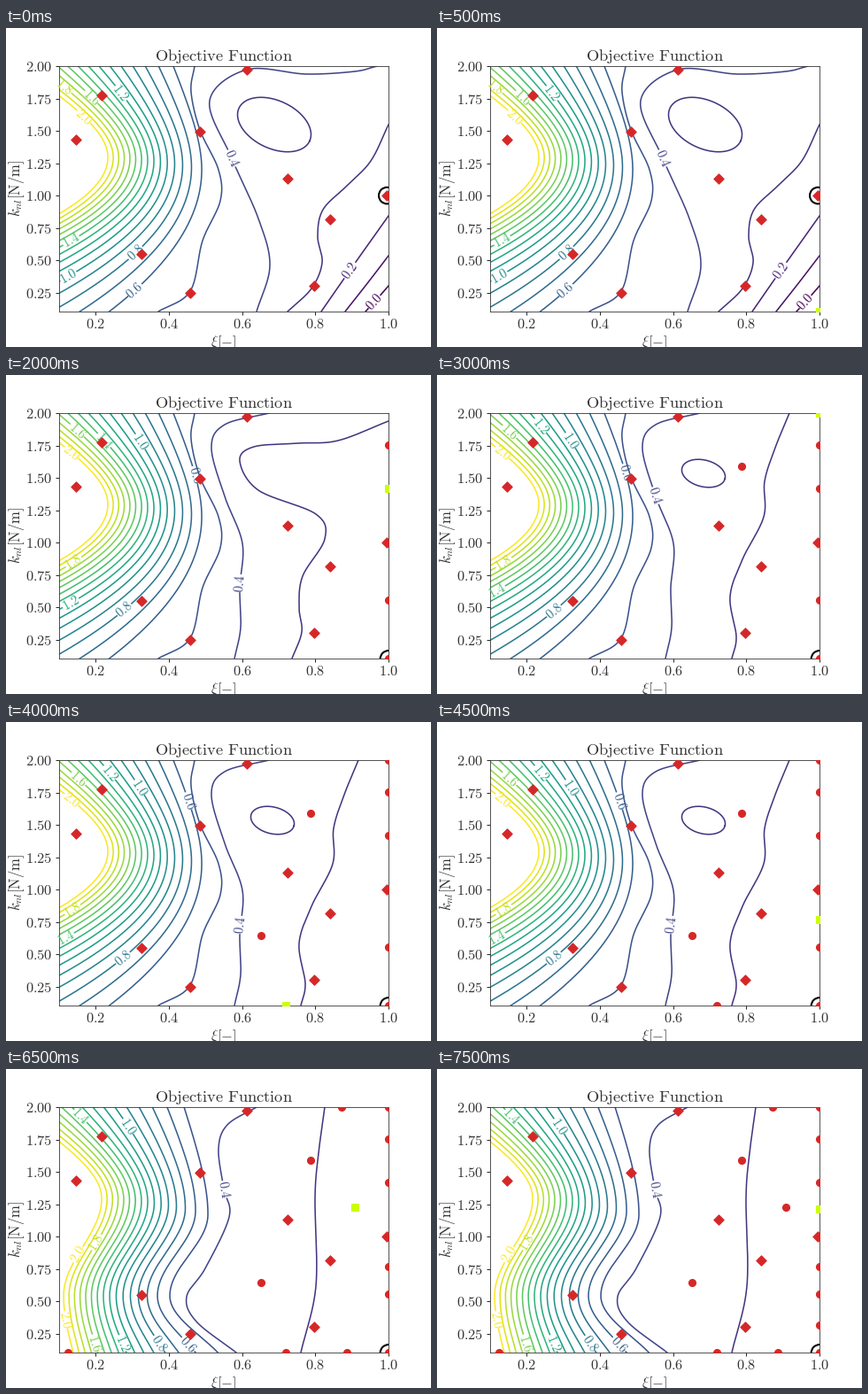
Animation, 480 px wide and 360 px high, one loop 8000 ms. Source, as a matplotlib script:

```python
import numpy as np
import matplotlib.pyplot as plt
from matplotlib.animation import FuncAnimation

plt.rcParams["mathtext.fontset"] = "cm"

W, H, DPI = 480, 360, 75
X0, X1, Y0, Y1 = 60, 432, 43.2, 320.4     # plot area in stage pixels
STEPS = 16
INK = "0.2"

# Key points of the lowest level lines, in stage pixels.
LINE_5 = [(213, 43), (209, 72), (219, 115), (240, 160), (242, 195),
          (222, 240), (208, 297), (172, 320)]
START_4 = [(419, 43), (394, 49), (339, 52), (272, 47), (230, 82), (255, 147),
           (285, 215), (298, 268), (283, 320)]
START_3 = [(432, 109), (412, 150), (385, 178), (358, 205), (352, 235),
           (357, 265), (345, 294), (318, 320)]
MID_4 = [(297, 43), (247, 56), (232, 82), (247, 137), (267, 190), (264, 240),
         (265, 285), (258, 320)]
BAY_3 = [(432, 52), (375, 74), (330, 77), (280, 81), (264, 97), (285, 130),
         (350, 157), (360, 185), (335, 227), (331, 262), (334, 290), (323, 320)]
TAIL_3 = [(345, 208), (331, 250), (338, 295), (333, 320)]
MID_3 = [(398, 43), (382, 82), (370, 120), (369, 160)] + TAIL_3
LATE_3 = [(360, 43), (350, 72), (365, 115), (373, 145)] + TAIL_3
VALLEY_4 = [(283, 43), (250, 63), (240, 90), (246, 135), (252, 167),
            (225, 225), (204, 257), (215, 285), (260, 320)]
VALLEY_3 = [(360, 43), (353, 95), (349, 145), (350, 245), (333, 320)]

# Height of the label on each labelled level.
START_TAGS = {20: 100, 18: 67, 16: 78, 14: 240, 12: 73, 10: 280, 8: 254,
              6: 296, 4: 147, 2: 274, 0: 309}
BAY_TAGS = {20: 88, 18: 211, 16: 63, 14: 74, 12: 257, 10: 75, 8: 265, 6: 113,
            4: 235}
MID_TAGS = {20: 88, 18: 212, 16: 64, 14: 243, 12: 57, 10: 74, 8: 266, 6: 110,
            4: 135}
VALLEY_TAGS = {20: (209, 283), 18: 196, 16: 309, 14: 53, 12: 309, 10: 65,
               8: 309, 6: 311, 4: 136}

SEEDS = [(0.147, 1.432), (0.217, 1.777), (0.612, 1.975), (0.485, 1.492),
         (0.725, 1.132), (0.84, 0.815), (0.797, 0.3), (0.458, 0.25),
         (0.324, 0.547), (0.996, 1.0)]
PICKS = [(1.0, 0.1), (1.0, 1.755), (1.0, 0.555), (1.0, 1.42), (0.787, 1.593),
         (1.0, 2.0), (0.652, 0.645), (0.72, 0.1), (1.0, 0.77), (0.872, 2.0),
         (0.887, 0.1), (0.123, 0.1), (0.907, 1.227), (1.0, 0.312),
         (1.0, 1.215)]


def to_data(px, py):
    return (0.1 + 0.9 * (px - X0) / (X1 - X0),
            2.0 - 1.9 * (py - Y0) / (Y1 - Y0))


def smooth(points, n=40):
    """Catmull-Rom curve through the points."""
    p = np.array(points, float)
    p = np.vstack([2 * p[0] - p[1], p, 2 * p[-1] - p[-2]])
    t = np.linspace(0, 1, n, endpoint=False)[:, None]
    parts = [b + t / 2 * (c - a + t * (2 * a - 5 * b + 4 * c - d
                                       + t * (3 * (b - c) + d - a)))
             for a, b, c, d in zip(p, p[1:], p[2:], p[3:])]
    return np.vstack(parts + [p[-2:-1]])


def ellipse(cx, cy, a, b, tilt):
    t = np.linspace(0, 2 * np.pi, 120)
    u, v, r = a * np.cos(t), b * np.sin(t), np.radians(tilt)
    return np.c_[cx + u * np.cos(r) - v * np.sin(r),
                 cy + u * np.sin(r) + v * np.cos(r)]


def ridge(level, valley):
    """One line of the steep left slope: a nose, widening with the level."""
    y = np.linspace(Y0, Y1, 400)
    nose = 140 + 120 / level
    d = y - nose
    crest = 210.8 - 5.43 * level + 257 / level - 7 * valley
    above = 5 * (level - 1) * (np.hypot(1, d / 57) - 1)
    below = 6.8e-4 * level * d ** 2
    if valley:
        phase = np.pi * d / (256 - nose)
        below = np.where(phase < np.pi, 21.5 * (1 - np.cos(phase)),
                         43 - 21.5 * (1 + np.cos(phase)) * 8 / level)
    return np.c_[crest - np.where(d < 0, above, below), y]


def level_lines(step):
    """All (level in tenths, curve) pairs and the label heights of a step."""
    if step >= 13:
        lines = [(v, ridge(v, True)) for v in range(5, 21)]
        lines += [(4, smooth(VALLEY_4)), (3, smooth(VALLEY_3))]
        return lines, VALLEY_TAGS

    lines = [(v, ridge(v, False)) for v in range(6, 21)]
    lines.append((5, smooth(LINE_5)))
    if step < 2:
        lines += [(4, smooth(START_4)), (3, smooth(START_3)),
                  (3, ellipse(303, 109, 44, 27, 25)),
                  (2, smooth([(432, 212), (388, 274), (356, 320)])),
                  (1, smooth([(432, 257), (409, 287), (383, 320)])),
                  (0, smooth([(432, 291), (418, 307), (406, 320)]))]
        return lines, START_TAGS

    lines.append((4, smooth(MID_4)))
    if step < 5:
        return lines + [(3, smooth(BAY_3))], BAY_TAGS
    if step < 10:
        lines += [(3, smooth(MID_3)), (3, ellipse(301, 111, 25, 15, 14))]
        late = {6: 89, 4: 229} if step > 6 else {}
        return lines, MID_TAGS | late
    return lines + [(3, smooth(LATE_3))], MID_TAGS


def draw_line(level, curve, heights):
    color = plt.cm.viridis(level / 20)
    shown = curve.copy()
    for y in np.atleast_1d(heights):
        i = np.abs(curve[:, 1] - y).argmin()
        i = min(max(i, 2), len(curve) - 3)
        dx, dy = curve[i + 2] - curve[i - 2]
        angle = (np.degrees(np.arctan2(-dy, dx)) + 90) % 180 - 90
        shown[np.hypot(*(curve - curve[i]).T) < 10.5] = np.nan
        ax.text(*to_data(*curve[i]), f"${level / 10:.1f}$", size=14,
                color=color, rotation=angle, ha="center", va="center",
                zorder=4)
    ax.plot(*to_data(*shown.T), color=color, lw=1.5, zorder=2)


fig, ax = plt.subplots(figsize=(W / DPI, H / DPI), dpi=DPI)
fig.text(246 / W, 1 - 345.5 / H, r"$\xi[-]$", size=16, color=INK,
         ha="center", va="top")
fig.text(12 / W, 1 - 180.5 / H, r"$k_{nl}\mathrm{[N/m]}$", size=16, color=INK,
         rotation=90, ha="center", va="center")


def dots(points, marker, color):
    if points:
        ax.scatter(*zip(*points), s=60, marker=marker, color=color, zorder=5)


def draw(step):
    ax.clear()
    lines, tags = level_lines(step)
    for level, curve in lines:
        draw_line(level, curve, tags.get(level, []))

    dots(SEEDS, "D", "tab:red")
    dots(PICKS[:max(step - 1, 0)], "o", "tab:red")
    if step:
        dots([PICKS[step - 1]], "s", "#ccff00")
    best = SEEDS[-1] if step < 2 else PICKS[0]
    ax.scatter(*best, s=320, facecolors="none", edgecolors="black",
               linewidths=2, zorder=6)

    ax.set_xlim(0.1, 1.0)
    ax.set_ylim(0.1, 2.0)
    ax.set_xticks(np.arange(0.2, 1.01, 0.2))
    ax.set_yticks(np.arange(0.25, 2.01, 0.25))
    ax.xaxis.set_major_formatter("${x:.1f}$")
    ax.yaxis.set_major_formatter("${x:.2f}$")
    ax.tick_params(labelsize=15.7, labelcolor=INK)
    ax.tick_params(axis="x", pad=2.5)
    ax.spines[:].set_color(INK)
    ax.set_title(r"$\mathrm{Objective\ Function}$", size=17.7, color=INK)
    return []


anim = FuncAnimation(fig, draw, frames=STEPS, interval=500, repeat=True,
                     repeat_delay=0, blit=False)
plt.show()
```
